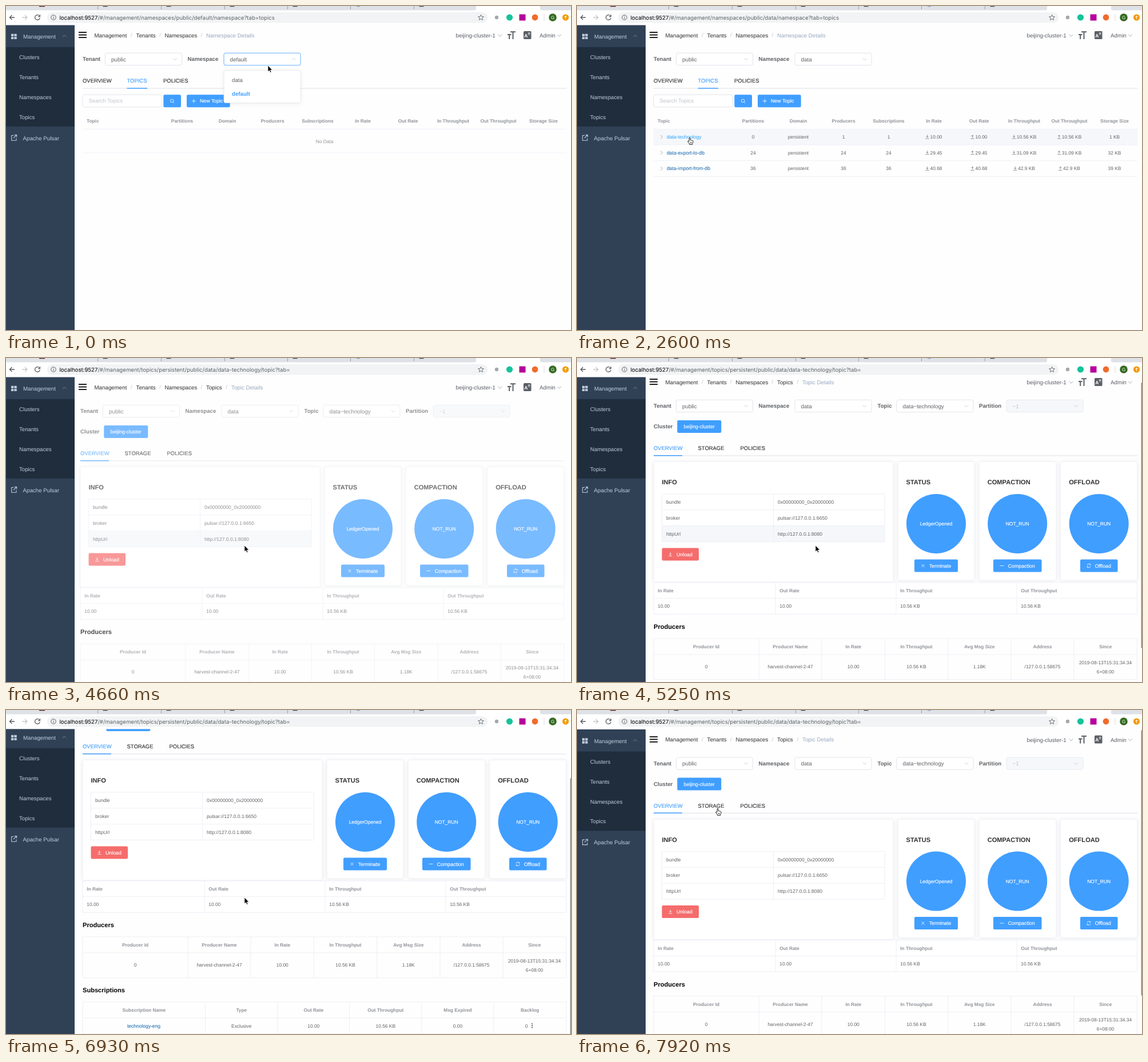
Write an HTML page that moves like this. It is 988 px wide and 567 px high and loops after 8000 ms.

```html
<!DOCTYPE html>
<html lang="en">
<head>
<meta charset="utf-8">
<title>Topic management</title>
<style>
  html, body { margin: 0; width: 100%; height: 100%; overflow: hidden; background: #fefefe; }
  svg { display: block; width: 988px; height: 567px; }
  text { font-family: 'Liberation Sans', Arial, sans-serif; white-space: pre; text-rendering: geometricPrecision; }
  .mid { text-anchor: middle; }
  .bold { font-weight: 700; }
  .med { stroke: currentColor; stroke-width: .15; }
  #url { font-family: Inter, 'Open Sans', sans-serif; fill: #5f6368; }
  #url tspan { fill: #202124; stroke: #202124; stroke-width: .15; }
  .card { filter: drop-shadow(0 1.4px 3.5px rgba(0, 0, 0, .07)); }
</style>
</head>
<body>
<svg id="stage" viewBox="0 0 988 567"></svg>
<script>
const BLUE = '#409eff', BODY = '#606266', MUTED = '#909399', PALE = '#c0c4cc',
      LINE = '#ebeef5', HOVER = '#f5f7fa', LINK = '#337ab7', MENU = '#bfcbd9', INK = '#303133';

const ICONS = {
  down: 'M0-3.5V1M-2-1L0 1 2-1M-3.2 3h6.4',
  up: 'M0 1.3V-3M-2-1L0-3 2-1M-3.2 3h6.4',
  cross: 'M-2.5-2.5l5 5m0-5l-5 5',
  minus: 'M-3.5 0h7',
  plus: 'M-3.5 0h7M0-3.5v7',
  refresh: 'M-3-.8a3 3 0 0 1 5.6-.9M3 .8a3 3 0 0 1-5.6.9M2.9-3.4v1.9H1M-2.9 3.4V1.5H-1',
  search: 'M1.6 1.6L3.6 3.6M2.4-.4a2.8 2.8 0 1 1-5.6 0a2.8 2.8 0 1 1 5.6 0',
  open: 'M-3.3-1.6L0 1.7 3.3-1.6',
  close: 'M-3.3 1.6L0-1.7 3.3 1.6',
  next: 'M-1.6-3.2L1.6 0-1.6 3.2'
};

// Drawing helpers; the y of a text is its visual centre.
const text = (s, x, y, size, fill = BODY, cls = '') =>
  `<text x="${x}" y="${y + size * .36}" font-size="${size}" fill="${fill}" color="${fill}" class="${cls}">${s}</text>`;
const rect = (x, y, w, h, fill, r = 0, stroke = 'none') =>
  `<rect x="${x}" y="${y}" width="${w}" height="${h}" rx="${r}" fill="${fill}" stroke="${stroke}" stroke-width=".8"/>`;
const path = (d, stroke, w = .8, fill = 'none') =>
  `<path d="${d}" stroke="${stroke}" stroke-width="${w}" fill="${fill}"/>`;
const disc = (x, y, r, fill) => `<circle cx="${x}" cy="${y}" r="${r}" fill="${fill}"/>`;
const icon = (name, x, y, color, w) =>
  `<g transform="translate(${x} ${y})">${path(ICONS[name], color, w)}</g>`;
const group = (id, body) => `<g id="${id}">${body}</g>`;
const cell = (s, x, y) => text(s, x, y, 8.4, BODY, 'mid');
const head = (s, x, y) => text(s, x, y, 8.3, MUTED, 'bold mid');

const button = (x, right, y, label, labelX, glyph, fill = BLUE) =>
  rect(x, y - 11, right - x, 22, fill, 2.2) +
  (glyph ? icon(glyph, labelX - 10.7, y, '#fff') : '') +
  text(label, labelX, y, 8.8, '#fff', 'med');

const field = (label, labelX, x, value, state = '') => {
  const off = state == 'off', open = state == 'open';
  return text(label, labelX, 93, 9.7, BODY, 'bold') +
    rect(x, 82.3, 134, 21.4, off ? HOVER : '#fff', 2.8, open ? BLUE : off ? '#e4e7ed' : '#dcdfe6') +
    text(value, x + 10.6, 93, 9.8, off ? PALE : BODY) +
    icon(open ? 'close' : 'open', x + 122, 93, PALE);
};

const tabs = (y, items, active) =>
  path(`M134 ${y + 13.2}H980`, '#e4e7ed', 1.3) +
  items.map(([s, x, w], i) =>
    text(s, x, y, 9.45, i == active ? BLUE : INK, 'med') +
    (i == active ? path(`M${x} ${y + 13}h${w}`, BLUE, 1.5) : '')).join('');

const grid = (xs, ys) => {
  const [x, y, right, bottom] = [xs[0], ys[0], xs.at(-1), ys.at(-1)];
  return path(xs.map(v => `M${v} ${y}V${bottom}`).join('') +
              ys.map(v => `M${x} ${v}H${right}`).join(''), LINE, .9);
};
const centres = xs => xs.slice(1).map((x, i) => (x + xs[i]) / 2);

const crumbs = items => items.map(([s, x], i) =>
  (i ? text('/', x - 8.2, 51, 9.7, PALE, 'mid') : '') +
  text(s, x, 51, 9.75, i == items.length - 1 ? '#97a8be' : INK)).join('');

// Pages
const column = i => 308 + 79 * i;

function row([name, parts, users, rate, flow, size], i) {
  const y = 229 + 27.7 * i;
  const moved = (s, col, dir) =>
    icon(dir, column(col) + 4 - s.length * 2.15 - 4.7, y, BODY, .7) + cell(s, column(col) + 4, y);
  return (i ? '' : `<rect id="hover" x="134" y="215.5" width="846" height="27.5" fill="${HOVER}"/>`) +
    path(`M134 ${y + 14}H980`, LINE) + icon('next', 148, y, MUTED) +
    (i ? text(name, 157, y, 8.6, LINK, 'med') : group('link', text(name, 157, y, 8.5, 'currentColor').replace(/ color="\w+"/, ''))) +
    [parts, 'persistent', users, users].map((s, c) => cell(s, column(c), y)).join('') +
    moved(rate, 4, 'down') + moved(rate, 5, 'up') + moved(flow, 6, 'down') + moved(flow, 7, 'up') +
    cell(size, column(8), y);
}

const listPage = (space, open, body) =>
  field('Tenant', 134, 173.5, 'public') + field('Namespace', 317.5, 381, space, open) +
  tabs(131, [['OVERVIEW', 134, 50], ['TOPICS', 211.5, 35.5], ['POLICIES', 275, 44]], 1) +
  rect(134, 155.2, 138, 21.6, '#fff', 2.8, '#dcdfe6') + text('Search Topics', 144.5, 166, 9.5, PALE) +
  rect(275.3, 155.3, 30.7, 22, BLUE, 2.2) + icon('search', 290.5, 166.3, '#fff') +
  button(316, 391.7, 166.3, 'New Topic', 339, 'plus') +
  text('Topic', 141, 201.5, 8.3, MUTED, 'bold') +
  ['Partitions', 'Domain', 'Producers', 'Subscriptions', 'In Rate', 'Out Rate', 'In Throughput',
   'Out Throughput', 'Storage Size'].map((s, i) => head(s, column(i), 201.5)).join('') +
  path('M134 215.5H980', LINE) + body;

const emptyPage = listPage('default', 'open',
  text('No Data', 557, 236.5, 8.4, MUTED, 'mid') + path('M134 257H980', LINE) +
  `<g class="card">${rect(381, 113, 134, 56.5, '#fff', 2.8, '#e4e7ed')}</g>` +
  `<rect id="option" x="381.5" y="118" width="133" height="23.6" fill="${HOVER}"/>` +
  text('data', 395, 130, 9.7) + text('default', 395, 153.5, 9.7, BLUE, 'bold'));

const dataPage = listPage('data', '', [
  ['data-technology', 0, 1, '10.00', '10.56 KB', '1 KB'],
  ['data-export-to-db', 24, 24, '29.45', '31.09 KB', '32 KB'],
  ['data-import-from-db', 36, 36, '40.68', '42.9 KB', '39 KB']
].map(row).join(''));

const statusCard = (x, w, title, state, glyph, action, left, right) =>
  `<g class="card">${rect(x, 190.5, w, 207.5, '#fff', 2.8, LINE)}</g>` +
  text(title, x + 14.5, 226, 11.1, INK, 'bold') +
  disc(x + 67, 299, 52, BLUE) + text(state, x + 67, 299, 8.5, '#fff', 'mid med') +
  button(left, right, 372.5, action, left + 25.7, glyph);

function detailPage() {
  const rates = [134, 347, 558, 769, 979.5],
        producers = [134, 318, 428, 538.5, 648.5, 759, 869, 979.5],
        subs = [134, 348.5, 475, 600.5, 727, 853, 979.5];
  const heads = (xs, y, labels) => centres(xs).map((x, i) => head(labels[i], x, y)).join('');
  const cells = (xs, y, values) => values.map((s, i) => cell(s, centres(xs)[i], y)).join('');
  const info = [['bundle', '0x00000000_0x20000000'], ['broker', 'pulsar://127.0.0.1:6650'],
                ['httpUrl', 'http://127.0.0.1:8080']];
  return field('Tenant', 134, 173.5, 'public') + field('Namespace', 317.5, 381, 'data') +
    field('Topic', 525.5, 559, 'data−technology') + field('Partition', 703, 751, '−1', 'off') +
    text('Cluster', 134, 129, 9.7, BODY, 'bold') +
    button(175.3, 252.3, 129, 'beijing-cluster', 186.5) +
    tabs(166.7, [['OVERVIEW', 134, 50], ['STORAGE', 211.5, 46], ['POLICIES', 285.5, 44]], 0) +
    statusCard(561, 134, 'STATUS', 'LedgerOpened', 'cross', 'Terminate', 590, 666) +
    statusCard(703.2, 134.5, 'COMPACTION', 'NOT_RUN', 'minus', 'Compaction', 728, 812.5) +
    statusCard(845.7, 134, 'OFFLOAD', 'NOT_RUN', 'refresh', 'Offload', 880, 945.5) +
    `<g class="card">${rect(134, 190.5, 419, 210.5, '#fff', 2.8, LINE)}</g>` +
    text('INFO', 148.5, 226, 11.1, INK, 'bold') +
    `<rect id="infoHover" x="148.5" y="302.7" width="389.5" height="27.8" fill="${HOVER}"/>` +
    grid([148.5, 343.5, 538], [247, 274.8, 302.7, 330.5]) +
    info.map(([k, v], i) => text(k, 156, 261 + 27.8 * i, 8.5) + text(v, 351, 261 + 27.8 * i, 8.5)).join('') +
    button(148.5, 213, 352.5, 'Unload', 174, 'down', '#f56c6c') +
    rect(134, 402, 846, 55, '#fff') + grid(rates, [402, 429.6, 457.2]) +
    ['In Rate', 'Out Rate', 'In Throughput', 'Out Throughput'].map((s, i) =>
      text(s, rates[i] + 7.3, 416, 8.3, MUTED, 'bold') +
      text(i < 2 ? '10.00' : '10.56 KB', rates[i] + 7.3, 443, 8.4)).join('') +
    text('Producers', 134, 479, 11.1, '#000', 'bold') + grid(producers, [500, 528, 571.5]) +
    heads(producers, 514.5, ['Producer Id', 'Producer Name', 'In Rate', 'In Throughput',
                             'Avg Msg Size', 'Address', 'Since']) +
    cells(producers, 549, ['0', 'harvest-channel-2-47', '10.00', '10.56 KB', '1.18K', '/127.0.0.1:58675']) +
    cell('2019-08-13T15:31:34.34', 924, 541.5) + cell('6+08:00', 924, 557.5) +
    text('Subscriptions', 134, 593.5, 11.1, '#000', 'bold') + grid(subs, [614, 642, 669.5]) +
    heads(subs, 628, ['Subscription Name', 'Type', 'Out Rate', 'Out Throughput', 'Msg Expired', 'Backlog']) +
    cells(subs, 655.5, ['', 'Exclusive', '10.00', '10.56 KB', '0.00']) +
    text('technology-eng', 241, 655.5, 8.5, LINK, 'mid med') + cell('0', 910, 655.5) +
    [-3.2, 0, 3.2].map(d => disc(920, 655.3 + d, .95, INK)).join('');
}

const header =
  path('M127 46.2h14M127 50.7h14M127 55.2h14', '#000', 1.7) + group('crumbs', '') +
  text('beijing-cluster-1', 786.5, 51.5, 9.8, '#5a5e66') + icon('open', 864, 51.5, MUTED) +
  path('M882 45.2H891M886.5 45V58M877 50H883.5M880.2 50V58', '#5a5e66', 2) +
  rect(905, 44, 13.5, 14, '#5a5e66', 1.5) + text('A', 906.3, 51.5, 8.5, '#fff', 'bold') +
  path('M912.5 47.5h4.5M914.7 46v1.5M913 51l3.5-3.5M913 47.8l3.5 3.2', '#fff', .7) +
  text('Admin', 933, 51.5, 9.8, '#5a5e66') + icon('open', 967.5, 51.5, MUTED);

const sidebar =
  rect(0, 33.3, 120, 560, '#304156') + rect(0, 72, 120, 138.8, '#1f2d3d') +
  [0, 1, 2, 3].map(i => rect(9 + i % 2 * 5.4, 48.7 + (i >> 1) * 5.2, 4.4, 4.2, MENU, .5)).join('') +
  text('Management', 30, 53.5, 9.75, MENU) + icon('close', 102, 52.5, '#8794a4') +
  ['Clusters', 'Tenants', 'Namespaces', 'Topics'].map((s, i) =>
    text(s, 23, 90 + 34.8 * i, 9.7, MENU)).join('') +
  path('M13.5 226.5H9.7V235.3H18V231.5M14.8 225.6H18.6V229.4M18.4 225.8L13.2 231', MENU, 1.1) +
  text('Apache Pulsar', 29.5, 231, 9.75, MENU);

const chrome =
  rect(0, 0, 988, 33.3, '#fff') +
  path('M0 0H822V5Q822 7.5 819 7.5H0ZM988 0H934V5Q934 7.5 937 7.5H988Z', 'none', 0, '#dee1e6') +
  [160.5, 271.5, 382.5, 492.5, 602.5, 713.5].map((x, i) =>
    path(`M${x} 0V6`, '#8f9296', .8) +
    (i == 4 ? path(`M${x + 10} 0q3 2 7 0`, '#7b88b8', 1) : rect(x + 9, 0, 8, 1.3, '#444', .5))).join('') +
  rect(58, 0, 10, 1.3, '#5b2026') +
  path('M15 20H6.5M10.5 16L6.5 20L10.5 24', '#55585c', 1.3) +
  path('M28.5 20H37M33 16L37 20L33 24', '#c4c6c9', 1.3) +
  path('M58.4 17.2A4.4 4.4 0 1 0 59.3 20.8M59.4 15.2V18.6H56', '#55585c', 1.3) +
  rect(72, 11, 770, 18.5, '#f1f3f4', 9.2) +
  path('M87.2 20a4.2 4.2 0 1 1-8.4 0a4.2 4.2 0 1 1 8.4 0M83 19.4V22.4M83 17.4V18.5', '#5f6368', 1) +
  `<text id="url" x="93.5" y="23.5" font-size="9.65"></text>` +
  path('M830.5 15.3l1.4 3.2 3.5.3-2.7 2.3.8 3.4-3-1.8-3 1.8.8-3.4-2.7-2.3 3.5-.3Z', '#5f6368', .9) +
  disc(858, 20, 3.2, '#a5a8ab') + disc(880.5, 20, 5.6, '#15c39a') +
  rect(897.5, 14.5, 11, 11, '#b5009c') + disc(925, 20, 5.4, '#f26b2c') +
  path('M941 14V26', '#cfd1d4', .8) +
  disc(956, 20, 6.8, '#33691e') + text('G', 956, 20.2, 8, '#fff', 'mid') +
  disc(978.5, 20, 5.6, '#f29900') + path('M978.5 23V17.5M976.2 19.6L978.5 17.3 980.8 19.6', '#fff', 1);

const cursors =
  group('arrow', path('M0 0V11L2.6 8.8 4.2 12.5 6 11.7 4.4 8.1H7.7Z', '#fff', .7, '#000')) +
  group('beam', path('M-3-5.6q2.5 0 3 1.2q.5-1.2 3-1.2M0-4.4V4.4M-3 5.6q2.5 0 3-1.2q.5 1.2 3 1.2M-1.6 1.2h3.2', '#222', .9)) +
  group('hand', path('M-1 1Q0-.8 1 1V4.6Q2.2 3.9 2.8 5Q4 4.3 4.6 5.5Q6 5.2 6 6.8Q6 9.8 4.8 10.8V12.4H-.4V11.2L-3.4 7.2Q-3.4 5.7-1.8 6.5L-1 7.2ZM1.2 8.3v2.2M3 8.3v2.2', '#111', .9, '#fff'));

const $ = id => document.getElementById(id);
$('stage').innerHTML =
  group('page', header + group('empty', emptyPage) + group('data', dataPage) + group('detail', detailPage())) +
  group('side', sidebar) + group('bar', rect(986.6, 0, 1.4, 464, '#858585')) + chrome + group('cursor', cursors);

// Moments when the picture changes: runs of [first, last, count].
const moments = [[0, 0, 1], [150, 300, 2], [600, 980, 3], [1640, 2600, 7], [3350, 3980, 5], [4270, 4270, 1],
  [4510, 4950, 4], [5250, 6030, 6], [6630, 6930, 3], [7080, 7590, 4], [7770, 7920, 2]]
  .flatMap(([a, b, n]) => Array.from({ length: n }, (_, i) => n > 1 ? a + (b - a) * i / (n - 1) : a));

// Linear tracks of [time, ...values].
function track(t, keys) {
  const i = keys.findIndex(k => k[0] > t);
  if (i < 0) return keys.at(-1).slice(1);
  if (!i) return keys[0].slice(1);
  const a = keys[i - 1], b = keys[i], p = (t - a[0]) / (b[0] - a[0]);
  return a.slice(1).map((v, j) => v + (b[j + 1] - v) * p);
}

const FADES = { // time, opacity, shift
  empty: [[500, 1, 0], [600, .6, 6], [790, .15, 16], [980, 0, 21]],
  data: [[1500, 0, -14], [1640, .2, -10], [1800, .65, -4], [1960, .95, -1], [2120, 1, 0],
         [3200, 1, 0], [3350, .75, 4], [3507, .3, 13], [3665, 0, 21]],
  detail: [[4270, 0, -18], [4510, .25, -12], [4657, .7, -4], [4803, .95, -1], [4950, 1, 0]]
};
const SCROLL = [[5100, 0], [5250, 9], [5406, 21], [5562, 30], [5718, 35.5], [6030, 39], [6480, 39],
  [6630, 52], [6780, 84], [6930, 103], [7080, 99], [7250, 65], [7420, 16], [7590, -4], [7770, -2], [7920, -.6]];
const BOUNCE = [[6780, 0], [6930, -5], [7080, -1], [7250, 0], [7420, 0], [7590, 4], [7770, 2], [7920, .6]];
const POINTER = [[0, 458, 104], [150, 441, 119], [300, 428, 132], [1640, 428, 132], [2600, 197, 230],
  [3665, 197, 230], [3980, 260, 262], [4270, 417, 328], [7420, 417, 328], [7590, 330, 250],
  [7770, 262, 186], [7920, 246, 172]];

const START = [['Management', 154.5], ['Tenants', 227.5], ['Namespaces', 277.5]];
const LIST = crumbs([...START, ['Namespace Details', 350]]);
const DETAIL = crumbs([...START, ['Topics', 350], ['Topic Details', 394]]);
const address = t => t < 600 ? 'namespaces/public/default/namespace?tab=topics'
  : t < 3350 ? 'namespaces/public/data/namespace?tab=topics'
  : 'topics/persistent/public/data/data-technology/topic?tab=';

const move = (id, x, y) => $(id).setAttribute('transform', `translate(${x} ${y})`);
const show = (id, on) => $(id).style.display = on ? '' : 'none';

function draw(t) {
  for (const id in FADES) {
    const [opacity, shift] = track(t, FADES[id]);
    $(id).style.opacity = opacity;
    move(id, shift, 0);
    show(id, opacity > 0);
  }
  const [scroll] = track(t, SCROLL);
  move('page', 0, -scroll);
  move('side', 0, track(t, BOUNCE)[0]);
  move('bar', 0, 36 + .81 * scroll);
  move('cursor', ...track(t, POINTER));
  $('crumbs').innerHTML = t < 3350 ? LIST : DETAIL;
  $('url').innerHTML = `<tspan>localhost:9527</tspan>/#/management/${address(t)}`;
  const overLink = t >= 2440 && t < 3665;
  $('link').style.color = overLink ? '#20a0ff' : LINK;
  show('hover', overLink);
  show('option', t >= 300);
  show('infoHover', t < 5400);
  show('bar', t >= 5250);
  const hand = overLink || t >= 7920, beam = t >= 4270 && t < 4510;
  show('hand', hand);
  show('beam', beam);
  show('arrow', !hand && !beam);
}

let last = -1;
function tick() {
  const now = performance.now() % 8000;
  const t = moments.findLast(m => m <= now);
  if (t !== last) draw(last = t);
  requestAnimationFrame(tick);
}
tick();
</script>
</body>
</html>
```
